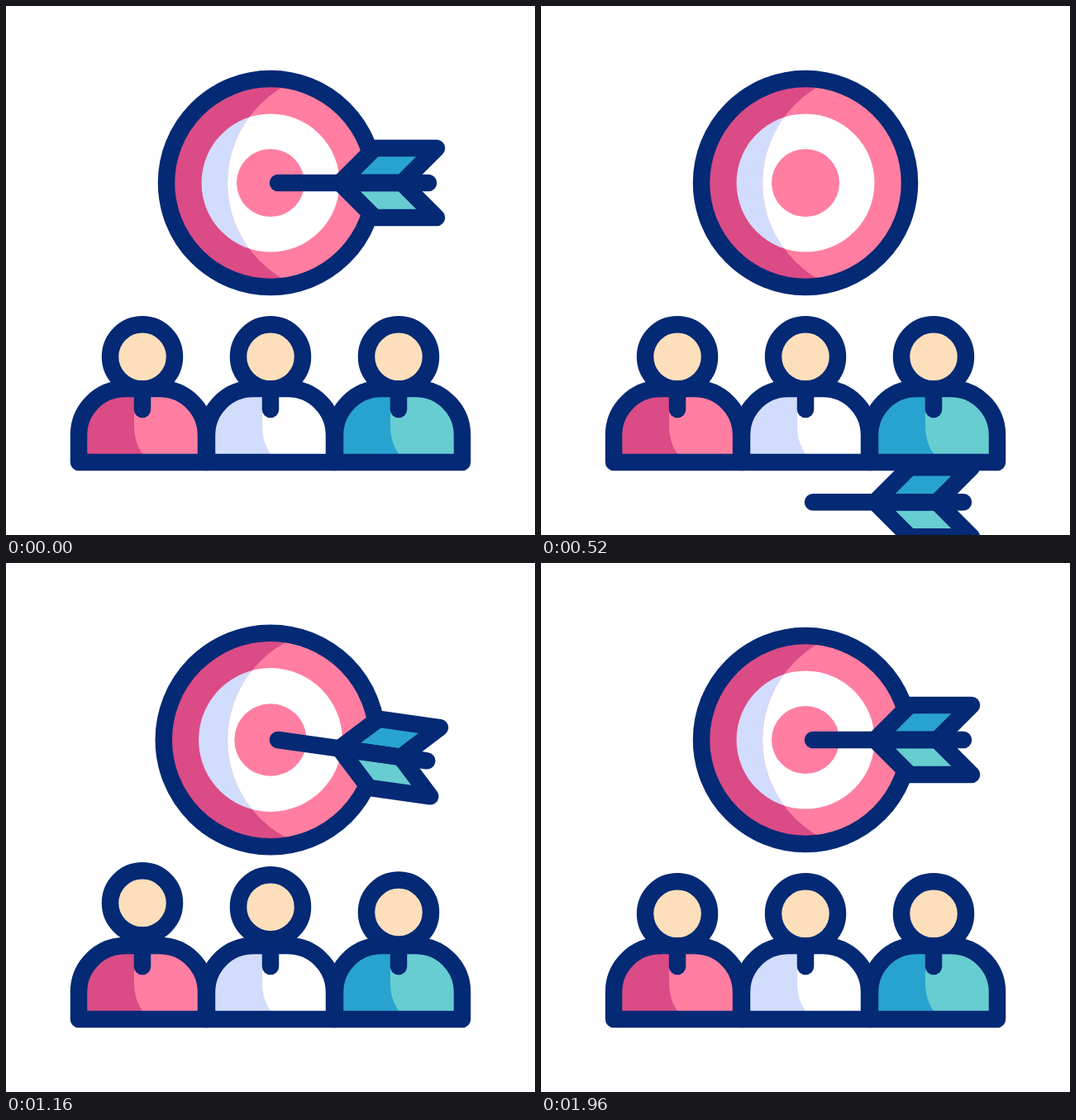
Animation of 640x640 px, one loop 2000 ms. Source, as an HTML page:

```html
<!DOCTYPE html>
<html lang="en">
<head>
<meta charset="utf-8">
<title>Team target</title>
<style>
  html, body { margin: 0; width: 100%; height: 100%; overflow: hidden; background: #fff; }
  svg { display: block; width: 100%; height: 100%; }
  .line { stroke: #042975; stroke-width: 20.5; stroke-linecap: round; stroke-linejoin: round; }
</style>
</head>
<body>
<svg viewBox="0 0 640 640">
  <defs>
    <clipPath id="lit"><circle cx="402" cy="214" r="134"/></clipPath>
  </defs>
  <g id="target">
    <circle class="outer" cx="320" cy="214" fill="#db4b85"/>
    <circle class="mid" cx="320" cy="214" fill="#d2dcfd"/>
    <g clip-path="url(#lit)">
      <circle class="outer" cx="320" cy="214" fill="#ff7ea1"/>
      <circle class="mid" cx="320" cy="214" fill="#fff"/>
    </g>
    <circle class="core" cx="320" cy="214" fill="#ff7ea1"/>
    <circle class="outer line" cx="320" cy="214" fill="none"/>
  </g>
  <g id="team"></g>
  <g id="arrow" class="line">
    <path d="M404 214L446 172H521L479 214Z" fill="#28a3cf"/>
    <path d="M404 214L446 256H521L479 214Z" fill="#67cdd1"/>
    <path d="M329 214H511"/>
  </g>
</svg>
<script>
const LOOP = 2000, STEP = 40;
const TIP = { x: 329, y: 214 };
const $ = s => document.querySelector(s);
const arrow = $('#arrow');

// rise and fall: start times and length of each move
const rings = [
  { name: 'outer', r: 126, grow: 0.2, up: 1070, down: 1500, len: 400 },
  { name: 'mid', r: 83.5, grow: 0.19, up: 1040, down: 1450, len: 400 },
  { name: 'core', r: 41, grow: 0.185, up: 1000, down: 1400, len: 400 }
].map(o => ({ ...o, nodes: document.querySelectorAll('.' + o.name) }));

const people = [
  { x: 165, dark: '#db4b85', light: '#ff7ea1', up: 988, down: 1378, len: 305 },
  { x: 320, dark: '#d2dcfd', light: '#fff', up: 1027, down: 1397, len: 320 },
  { x: 475, dark: '#28a3cf', light: '#67cdd1', up: 1103, down: 1480, len: 320 }
];

const body = 'M-77 552V519a56 56 0 0 1 56-56H21a56 56 0 0 1 56 56V552Z';
const shade = 'M-77 552V519a56 56 0 0 1 56-56H-10V508C-10 522-6 534 1 543V552Z';

$('#team').innerHTML = people.map(p => `
  <g transform="translate(${p.x} 0)">
    <path d="${body}" fill="${p.light}"/>
    <path d="${shade}" fill="${p.dark}"/>
    <path class="line" d="${body}" fill="none"/>
    <path class="line" d="M0 468V488"/>
    <circle class="head line" cy="424.3" r="39" fill="#fddfbc"/>
  </g>`).join('');
const heads = document.querySelectorAll('.head');

const smooth = (t, a, b) => {
  const x = Math.min(1, Math.max(0, (t - a) / (b - a)));
  return x * x * (3 - 2 * x);
};
const pulse = (t, o) =>
  smooth(t, o.up, o.up + o.len) - smooth(t, o.down, o.down + o.len);

// eased value through [time, value] keys
function track(t, keys) {
  let v = keys[0][1];
  for (let i = 1; i < keys.length; i++) {
    v += (keys[i][1] - keys[i - 1][1]) * smooth(t, keys[i - 1][0], keys[i][0]);
  }
  return v;
}

const shakeOff = [[50, 0], [125, -8], [260, 8], [430, 0]];
const shakeHit = [[1000, 0], [1080, -8], [1160, 8], [1445, 0]];

function arrowPose(t) {
  if (t < 700) {
    const fall = Math.max(0, t - 100);
    return { x: 0, y: 0.00219 * fall * fall, turn: track(t, shakeOff) };
  }
  const left = Math.max(0, (1000 - t) / 120);
  return { x: 261 * left, y: -2 * left, turn: track(t, shakeHit) };
}

function draw(t) {
  for (const o of rings) {
    const r = o.r * (1 + o.grow * pulse(t, o));
    o.nodes.forEach(n => n.setAttribute('r', r.toFixed(2)));
  }
  people.forEach((p, i) =>
    heads[i].setAttribute('transform', `translate(0 ${(-21.8 * pulse(t, p)).toFixed(2)})`));
  const a = arrowPose(t);
  arrow.setAttribute('transform',
    `translate(${a.x.toFixed(2)} ${a.y.toFixed(2)}) rotate(${a.turn.toFixed(2)} ${TIP.x} ${TIP.y})`);
}

const start = performance.now();
function tick() {
  const t = (performance.now() - start) % LOOP;
  draw(Math.floor(t / STEP) * STEP);
  requestAnimationFrame(tick);
}
draw(0);
requestAnimationFrame(tick);
</script>
</body>
</html>
```
